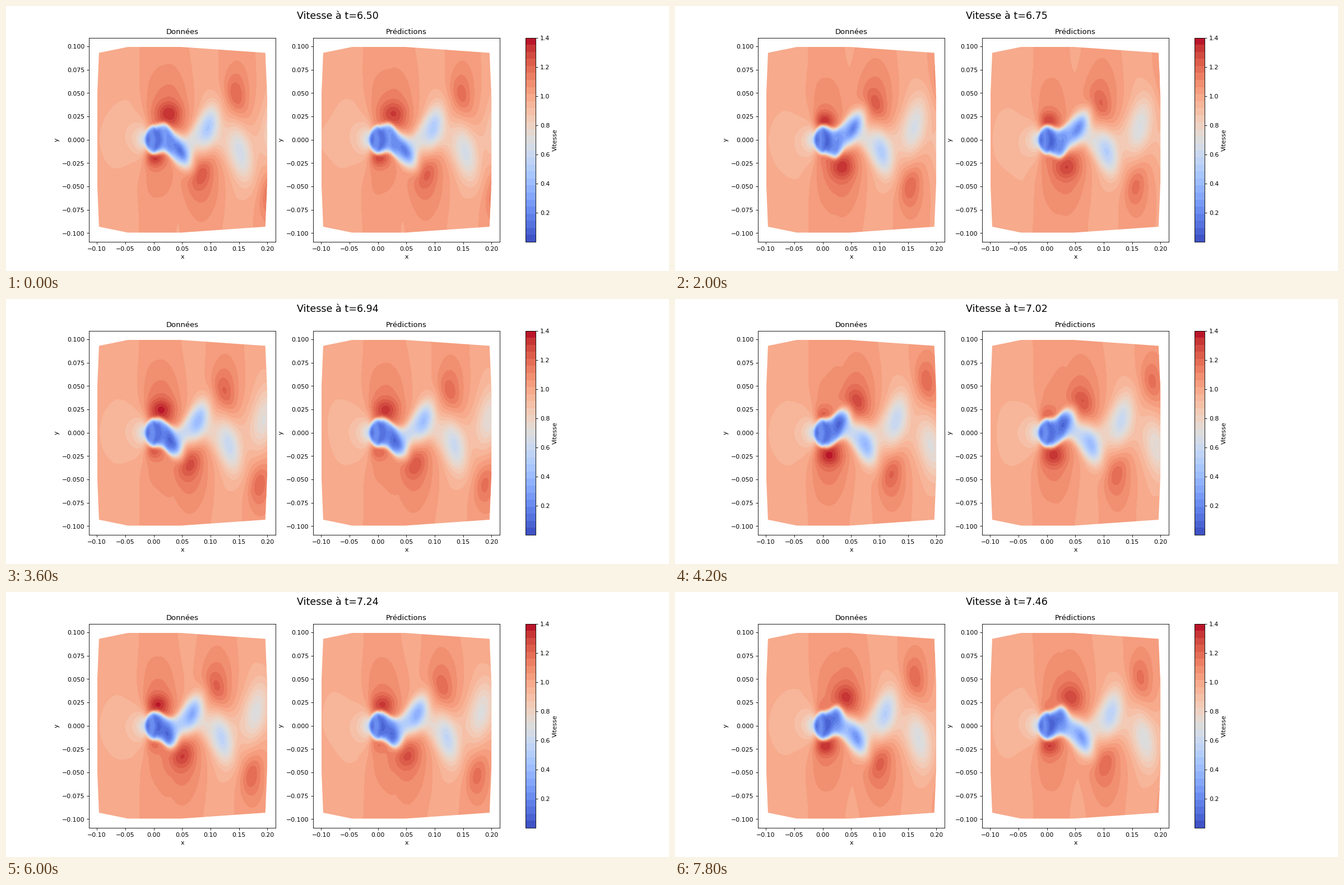
A matplotlib script for the animation above (8000 ms loop, 1183 px wide and 473 px high).

```python
import numpy as np
import matplotlib.pyplot as plt
from matplotlib.animation import FuncAnimation
from matplotlib.path import Path

FRAMES, INTERVAL = 40, 200
T0, DT = 6.50, 0.0246
PERIOD = 0.1563  # vortex shedding period
LEVELS = np.linspace(0, 1.4, 30)

gx, gy = np.meshgrid(np.linspace(-0.1, 0.2, 171), np.linspace(-0.1, 0.1, 171))

# Half outline of the meshed domain, mirrored in y
upper = [(-0.0992, 0.05), (-0.0963, 0.0931), (-0.0455, 0.0994),
         (0.048, 0.0994), (0.1966, 0.0931), (0.1999, 0.0455)]
HULL = Path(upper + [(x, -y) for x, y in upper[::-1]] + upper[:1])

# Slow cells start at X0 and speed up: x = X0 + SPEED * age + ACCEL * age**2
X0, SPEED, ACCEL = 0.005, 0.0385, 0.0036


def bell(u, v=0, power=2):
    return np.exp(-np.abs(u) ** power - np.abs(v) ** power)


def sigmoid(u):
    return 0.5 * (1 + np.tanh(u / 2))


def slow_x(age):
    return X0 + SPEED * age + ACCEL * age**2


def slow_age(x):
    """Inverse of slow_x."""
    reach = np.maximum(x - X0, 0)
    return (np.sqrt(SPEED**2 + 4 * ACCEL * reach) - SPEED) / (2 * ACCEL)


def fast_x(age):
    """Fast lobes cling to the body, then drift at constant speed."""
    return 0.0186 * np.log1p(np.exp((age - 0.65) / 0.3))


def shed(q):
    """Age and side of each structure alive at half-period count q."""
    q %= 2
    for n in range(-2, 6):
        if -1 < n + q < 5:
            yield n + q, (1 if n % 2 else -1)


def fast_flow(x, y, q, gain):
    """Outer stream with the accelerated lobes."""
    high = bell((x - 0.005) / 0.037, power=4)
    lobes = 0
    for a, side in shed(q):
        birth = min(a + 1, 1)
        young = sigmoid((2.4 - a) / 0.25)
        grown = sigmoid((a - 1.5) / 0.15)
        cx = fast_x(a)
        out = side * y - 0.018 - 0.009 * max(a, 0)
        outside = sigmoid(side * y / 0.006)
        high = np.maximum(high, birth * outside * bell((x - cx) / 0.042))

        # Young cores reach inwards to the edge of the wake
        depth = np.where(out < 0, out * np.clip(a / 2, 0.2, 1), out)
        core = 0.06 + 0.2 * sigmoid((1.6 - a) / 0.5)
        size = 0.015 + 0.007 * bell((a - 0.9) / 0.8)
        lobes = lobes + birth * core * outside * bell(
            (x - cx + 0.45 * grown * out) / size, depth / (0.01 + 0.0025 * max(a, 0)))

        halo = 0.06 + 0.05 * np.clip(a / 0.6, 0, 1)
        lobes = lobes + birth * halo * outside * bell(
            (x - cx) / (0.02 + 0.018 * young), (out - 0.008) / (0.025 + 0.013 * young))
    return 0.987 + 0.05 * high + gain * lobes


def slow_flow(x, y, q, gain):
    """Remaining share of the speed in the body, wake and slow cells."""
    # Stagnation zone ahead of the cylinder
    ahead = np.clip(0.0002 / (x**2 + (1.72 * y) ** 2 + 1e-6), 0, 0.95)
    keep = 1 - ahead * sigmoid((-0.014 - x) / 0.004)

    # Body and near wake, faintly streaked, on a meandering centreline
    swing = 0.013 * (1 - bell(x / 0.03))
    off = y - swing * np.cos(np.pi * (slow_age(x) - q))
    body = bell(np.hypot(x, y) / 0.0155, power=8)
    near = sigmoid(x / 0.002) * bell(x / 0.036, power=4) * bell(off / 0.0155, power=6)
    streak = 0.86 + 0.06 * np.cos(2 * np.pi * (x + 0.014 + 0.35 * np.abs(y)) / 0.023)
    keep = keep * (1 - streak * np.maximum(body, near))

    # Far wake
    depth = 0.9 * np.exp(-np.maximum(x, 0) / 0.06) * sigmoid((x - 0.025) / 0.004)
    width = 0.0135 + 0.11 * np.maximum(x - 0.04, 0)
    keep = keep * (1 - depth * bell(off / width, power=2.5))

    for a, side in shed(q):
        if a <= 0:
            continue
        dx = x - slow_x(a)
        dy = -side * y - 0.013 * np.tanh(1.5 * a)
        tilt = 0.33 + 0.35 * sigmoid((1.4 - a) / 0.2)
        drop = np.tanh(3 * a) * (0.85 * np.exp(-0.37 * a) + 0.2 * bell((a - 1) / 0.4))
        cell = bell((dx - tilt * dy) / (0.011 + 0.0027 * a), dy / (0.009 + 0.0072 * a))
        # Weak outer band above or below the slow cell
        band = 0.05 * np.clip(a - 1.2, 0, 1) * bell(dx / 0.028, (dy - 0.015) / 0.045)
        keep = keep * (1 - gain * drop * cell) * (1 - band)
    return keep


def truth(q, k):
    return fast_flow(gx, gy, q, 1) * slow_flow(gx, gy, q, 1)


def prediction(q, k):
    x = gx - 0.002 * sigmoid((gx - 0.04) / 0.01)
    ripple = 0.004 * np.sin(70 * gx + 1.3 * k) * np.cos(45 * gy + 0.9 * k)
    speed = fast_flow(x, gy, q, 0.88) * slow_flow(x, gy, q, 0.94)
    return speed + ripple * np.clip(speed, 0, 1)


fig, axes = plt.subplots(1, 2, figsize=(15, 6), dpi=78.87)  # 1183 x 473 px
PANELS = list(zip(axes, (truth, prediction)))
layers = []


def draw(k):
    q = 2 * k * DT / PERIOD
    while layers:
        layers.pop().remove()
    for ax, field in PANELS:
        speed = np.clip(field(q, k), 0.001, 1.399)
        cs = ax.contourf(gx, gy, speed, levels=LEVELS, cmap="coolwarm")
        cs.set_clip_path(HULL, ax.transData)
        layers.append(cs)
    heading.set_text(f"Vitesse à t={T0 + k * DT:.2f}")
    return layers


heading = fig.suptitle("", fontsize=16)
draw(0)
for ax, name in zip(axes, ("Données", "Prédictions")):
    ax.set(title=name, xlabel="x", ylabel="y",
           xlim=(-0.1141, 0.2149), ylim=(-0.1093, 0.1093))
bar = fig.colorbar(layers[0], ax=list(axes), label="Vitesse")
bar.set_ticks(np.arange(1, 8) * 0.2)

anim = FuncAnimation(fig, draw, frames=FRAMES, interval=INTERVAL,
                     repeat=True, repeat_delay=0)
plt.show()
```
